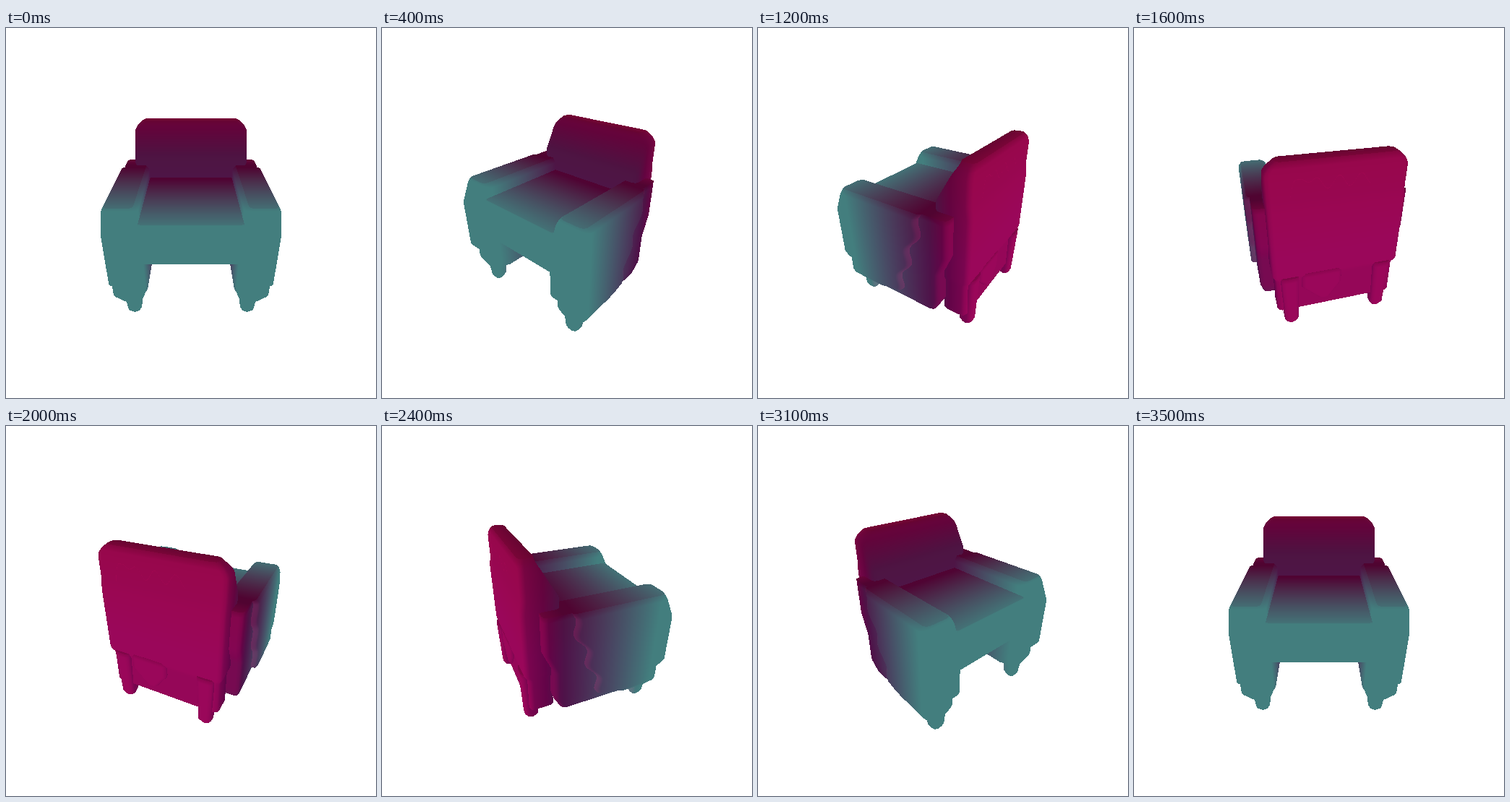
An HTML page with a canvas that plays this animation: 512 px wide and 512 px high, repeating every 3.6 s.

```html
<!DOCTYPE html>
<html lang="en">
<head>
<meta charset="utf-8">
<title>Armchair turntable</title>
<style>
html, body { margin: 0; width: 100%; height: 100%; overflow: hidden; background: #fff; }
canvas { display: block; }
</style>
</head>
<body>
<canvas id="stage" width="512" height="512"></canvas>
<script>
const SIZE = 512, FOCAL = 443, DIST = 394.5, SIN = 0.5, COS = 0.866;
const STEP = 100, FRAMES = 36, SLICE = 3;
const ctx = document.getElementById('stage').getContext('2d');
const image = ctx.createImageData(SIZE, SIZE);
const pixels = new Uint32Array(image.data.buffer);
const depth = new Float32Array(SIZE * SIZE);
const verts = [], tris = [];

const clamp = v => Math.max(0, Math.min(1, v));
// 0 at a, 1 at b; a may be above b.
const ramp = (a, b, v) => clamp((v - a) / (b - a));
const curve = (a, b, v) => ramp(a, b, v) ** 2;

// A vertex is x, y (up), z (front), its normal towards the front, its normal upwards.
const addVert = (...v) => verts.push(v) - 1;

function quad(a, b, c, d) {
  tris.push([a, b, c], [a, c, d]);
}

// Ring of a rounded rectangle at height y.
function ring(y, [x0, x1, z0, z1], up) {
  const r = Math.min(5, (x1 - x0) / 2, (z1 - z0) / 2), ids = [];
  for (let k = 0; k < 4; k++) {
    const cx = k === 0 || k === 3 ? x1 - r : x0 + r;
    const cz = k < 2 ? z1 - r : z0 + r;
    for (let j = 0; j < 3; j++) {
      const a = (k + j / 2) * Math.PI / 2;
      ids.push(addVert(cx + r * Math.cos(a), y, cz + r * Math.sin(a), (1 - up) * Math.sin(a), up));
    }
  }
  return ids;
}

function cap(y, box) {
  const ids = ring(y, box, 1);
  for (let i = 2; i < ids.length; i++) tris.push([ids[0], ids[i - 1], ids[i]]);
}

// Solid whose section [x0, x1, z0, z1] is a function of the height.
function loft(top, bottom, section) {
  const count = Math.ceil((top - bottom) / SLICE);
  let last;
  for (let i = 0; i <= count; i++) {
    const y = top + (bottom - top) * i / count;
    const next = ring(y, section(y), 0.6 * ramp(top - 6, top, y));
    if (last) last.forEach((id, j) => {
      const k = (j + 1) % last.length;
      quad(id, last[k], next[k], next[j]);
    });
    last = next;
  }
  cap(top, section(top));
  cap(bottom, section(bottom));
}

function pair(top, bottom, section) {
  loft(top, bottom, section);
  loft(top, bottom, y => {
    const [x0, x1, z0, z1] = section(y);
    return [-x1, -x0, z0, z1];
  });
}

function foot(x, z, top) {
  pair(top, -97, y => {
    const r = 10 - 2 * ramp(top, -92, y) - 3 * ramp(-92, -97, y);
    return [x - r, x + r, z - r, z + r];
  });
}

// Arm cover, its rear edge running down in drips.
pair(48, -77, y => {
  const lip = curve(40, 48, y), hem = ramp(-64, -78, y);
  const rear = -30 + 0.33 * (40 - y) + 4 * Math.cos(0.16 * (y - 41)) + 20 * ramp(-59, -64, y);
  const front = 88 - 13 * ramp(20, 48, y) - 10 * ramp(-40, -44, y) - 6 * hem;
  return [52 + 4 * lip + 5 * hem, 88 - 3 * lip - 10 * hem, rear, front];
});
// Inner layer of the arm.
pair(48, -74, y => {
  const hem = ramp(-58, -74, y);
  return [52 + 4 * curve(40, 48, y), 82 - 3 * hem, -58 + 10 * ramp(4, -20, y) + 8 * hem, 60];
});
// Backrest with its cover.
loft(98, -76, y => {
  const lip = curve(84, 98, y), hem = ramp(-27, -35, y);
  const half = 70 - 11 * lip - 3 * hem;
  return [-half, half, -76 + 2 * ramp(48, 62, y) + 3 * lip + 4 * hem, -36 - 20 * ramp(58, 94, y) - 8 * hem];
});
// Drip between the rear feet.
loft(-26, -64, y => {
  const end = ramp(-46, -64, y);
  return [-6 + 13 * end, 40 - 18 * end, -76, -66];
});
// Seat.
loft(32, -13, y => [-54, 54, -45, 87 - 8 * curve(20, 32, y) - 4 * ramp(-6, -13, y)]);
foot(67, 64, -66);
foot(52, -68, -28);

// Scalloped fold across the top of the back.
function scallop(x) {
  return 82 - 6 * ramp(36, 22, x) * (1 + Math.cos((x - 12) * 0.29)) - 20 * curve(42, 48, x);
}
for (let x = -30; x < 48; x += 2) {
  const a = scallop(x), b = scallop(x + 2);
  quad(addVert(x, a - 1.5, -74.4, -0.9, 0), addVert(x + 2, b - 1.5, -74.4, -0.9, 0),
       addVert(x + 2, b, -74.8, -1.3, 0), addVert(x, a, -74.8, -1.3, 0));
}

// Teal at the front, pink at the back, maroon in between; upward faces are darker.
function colour(y, z, n, up) {
  const teal = clamp((z + 53) / 120 - 0.2 * up);
  const pink = 0.7 * ramp(-38, -76, z) + 0.4 * Math.max(0, -n);
  const base = 66 - 0.14 * Math.max(0, y) - 10 * up;
  const r = 80 - 13 * teal + 68 * pink;
  const g = 4 + 122 * teal + 3 * pink;
  const b = base + (126 - base) * teal + 22 * pink;
  return 0xff000000 | b << 16 | g << 8 | r;
}

function project([x, y, z, n, up], c, s) {
  const px = x * c - z * s, pz = x * s + z * c;
  const w = 1 / (DIST - SIN * y - COS * pz);
  return [256 + FOCAL * px * w, 256 + FOCAL * (SIN * pz - COS * y) * w, w, y * w, z * w, n * w, up * w];
}

function fill(a, b, c) {
  const area = (b[0] - a[0]) * (c[1] - a[1]) - (b[1] - a[1]) * (c[0] - a[0]);
  if (Math.abs(area) < 1e-6) return;
  const left = Math.floor(Math.min(a[0], b[0], c[0])), right = Math.ceil(Math.max(a[0], b[0], c[0]));
  const top = Math.floor(Math.min(a[1], b[1], c[1])), bottom = Math.ceil(Math.max(a[1], b[1], c[1]));
  for (let py = top; py < bottom; py++) {
    for (let px = left; px < right; px++) {
      const x = px + 0.5, y = py + 0.5;
      const u = ((b[0] - x) * (c[1] - y) - (b[1] - y) * (c[0] - x)) / area;
      const v = ((c[0] - x) * (a[1] - y) - (c[1] - y) * (a[0] - x)) / area;
      const t = 1 - u - v;
      if (u < 0 || v < 0 || t < 0) continue;
      const w = u * a[2] + v * b[2] + t * c[2], at = py * SIZE + px;
      if (w <= depth[at]) continue;
      depth[at] = w;
      const mix = i => (u * a[i] + v * b[i] + t * c[i]) / w;
      pixels[at] = colour(mix(3), mix(4), mix(5), mix(6));
    }
  }
}

function draw(frame) {
  const angle = frame / (FRAMES - 1) * 2 * Math.PI;
  const c = Math.cos(angle), s = Math.sin(angle);
  pixels.fill(0xffffffff);
  depth.fill(0);
  const pts = verts.map(v => project(v, c, s));
  for (const [i, j, k] of tris) fill(pts[i], pts[j], pts[k]);
  ctx.putImageData(image, 0, 0);
}

let shown = -1;
function tick() {
  const frame = Math.floor(performance.now() / STEP) % FRAMES;
  if (frame !== shown) draw(shown = frame);
  requestAnimationFrame(tick);
}
tick();
</script>
</body>
</html>
```
